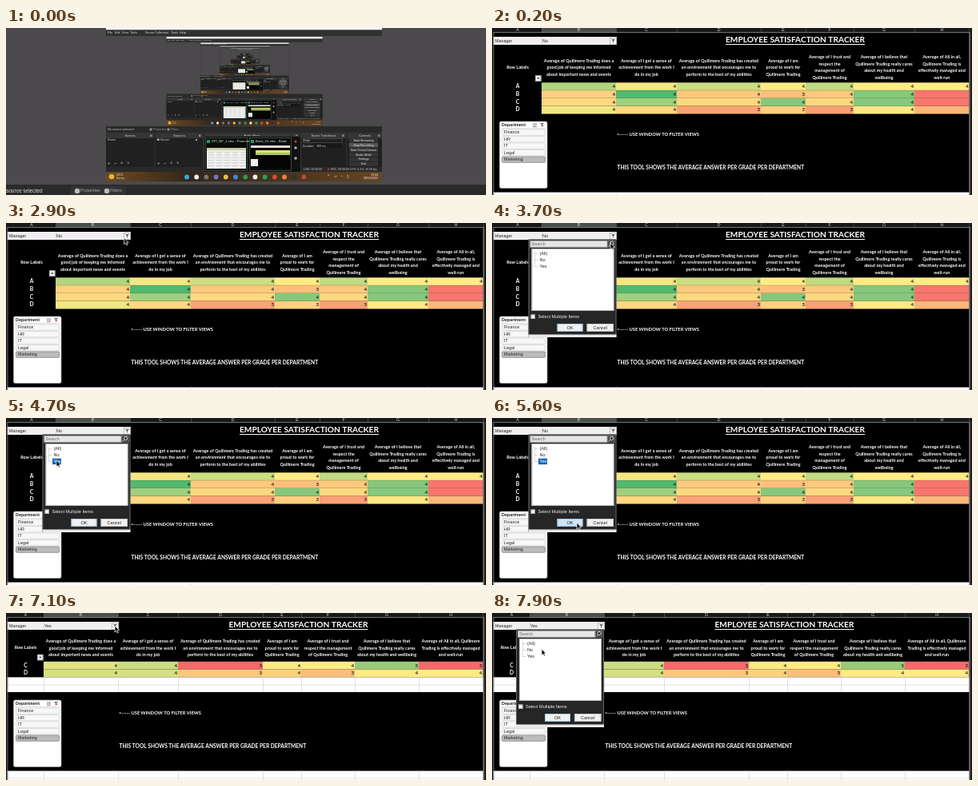
Recreate the animation shown at these times as an HTML page with a canvas. Size 600 by 209 pixels, loop 8 s.

```html
<!DOCTYPE html>
<html lang="en">
<head>
<meta charset="utf-8">
<title>Employee satisfaction tracker</title>
<style>
html, body { margin: 0; width: 600px; height: 209px; overflow: hidden; background: #000; }
canvas { display: block; }
</style>
</head>
<body>
<canvas id="stage" width="600" height="209"></canvas>
<script>
const ctx = document.getElementById('stage').getContext('2d');
const LOOP = 8000;
const SHEET = 'Lato, "Open Sans", sans-serif';
const UI = '"Liberation Sans", Arial, sans-serif';
const FIRM = 'Quillmere Trading';

function box(x, y, w, h, fill, line) {
  if (fill) { ctx.fillStyle = fill; ctx.fillRect(x, y, w, h); }
  if (line) { ctx.strokeStyle = line; ctx.lineWidth = 0.8; ctx.strokeRect(x + .5, y + .5, w - 1, h - 1); }
}
function round(x, y, w, h, r, fill, line) {
  ctx.beginPath(); ctx.roundRect(x, y, w, h, r);
  if (fill) { ctx.fillStyle = fill; ctx.fill(); }
  if (line) { ctx.strokeStyle = line; ctx.lineWidth = 0.7; ctx.stroke(); }
}
function dot(x, y, r, fill) {
  ctx.beginPath(); ctx.arc(x, y, r, 0, 7); ctx.fillStyle = fill; ctx.fill();
}
function text(str, x, y, size, color, o = {}) {
  ctx.font = `${o.weight || 400} ${size}px ${o.face || UI}`;
  ctx.textAlign = o.align || 'left';
  ctx.textBaseline = 'middle';
  ctx.fillStyle = color;
  ctx.fillText(str, x, y);
}
function poly(points, fill, line) {
  ctx.beginPath();
  points.forEach(([x, y]) => ctx.lineTo(x, y));
  ctx.closePath();
  if (fill) { ctx.fillStyle = fill; ctx.fill(); }
  if (line) { ctx.strokeStyle = line; ctx.lineWidth = 0.7; ctx.stroke(); }
}

// ---------- recording window, nested inside itself ----------

function thumbnail(x, title, spreadsheet) {
  box(x, 137, 53, 42, '#0c0c0c', '#3f5a46');
  box(x + 2, 140, 4, 4, '#1e9e55');
  text(title, x + 8, 142, 4.2, '#d9f0dd');
  if (spreadsheet) {
    box(x + 2, 150, 49, 26, '#050505');
    box(x + 2, 147, 49, 3, '#d8d8d8');
    box(x + 8, 153, 43, 3, '#e8dd6c');
    box(x + 8, 156, 43, 3, '#a9c769');
    box(x + 2, 164, 9, 9, '#eee');
  } else {
    box(x + 2, 150, 49, 26, '#efefef');
    box(x + 2, 150, 49, 3, '#c6cfa0');
    for (let i = 0; i < 6; i++) {
      for (let k = 0; k < 5; k++) box(x + 4 + k * 10, 155 + i * 3.4, 7, .6, '#bbb');
    }
  }
}

function dock(x, w, title) {
  box(x, 131, w, 43, '#202020');
  box(x, 131, w, 7, '#353535');
  text(title, x + w / 2, 134.8, 3.9, '#ddd', { align: 'center' });
  box(x + w - 5, 133.5, 2.5, 2.5, '#888');
}

function recorder(depth) {
  box(125, -2, 345, 194, '#414041');
  box(125, -2, 345, 4.5, '#f4f4f4');
  box(125, 2.5, 345, 7.5, '#303030');
  [['File', 127], ['Edit', 136], ['View', 145], ['Tools', 155], ['Scene Collection', 174], ['Tools', 206], ['Help', 217]]
    .forEach(([s, x]) => text(s, x, 6, 3.9, '#ddd'));
  box(125, 10, 345, 113, '#4b494b');
  if (depth) {
    ctx.save();
    ctx.translate(200.6, 11);
    ctx.scale(.565, .573);
    ctx.translate(-125, 2);
    recorder(depth - 1);
    ctx.restore();
  }

  box(125, 123, 345, 69, '#292929');
  text('No source selected', 127, 127, 3.8, '#ccc');
  dot(181, 127, 1.8, '#888'); text('Properties', 184, 127, 3.6, '#999');
  dot(203, 127, 1.8, '#888'); text('Filters', 206, 127, 3.6, '#999');

  dock(125, 60, 'Scenes');
  dock(187, 59, 'Sources');
  dock(248, 119, 'Audio Mixer');
  dock(369, 56, 'Scene Transitions');
  dock(427, 43, 'Controls');
  text('Scene', 127, 140, 3.6, '#ddd');
  text('Screen', 193, 140, 3.6, '#ddd');
  box(189, 138.5, 2.5, 2.5, '#bbb');
  dot(238, 140, 1, '#ddd');
  for (const x of [127, 189]) {
    ['+', '−', '˄', '˅'].forEach((s, i) => text(s, x + i * 8, 169.5, 6, '#ddd'));
  }
  text('Fade', 372, 141, 3.6, '#ddd');
  box(371, 138, 50, 6, null, '#4a4a4a');
  text('Duration', 371, 147.5, 3.6, '#ddd');
  box(386, 144.5, 34, 6, '#171717');
  text('300 ms', 388, 147.5, 3.6, '#ddd');
  ['Start Streaming', 'Stop Recording', 'Start Virtual Camera', 'Studio Mode', 'Settings', 'Exit'].forEach((s, i) => {
    box(429, 138 + i * 5.9, 36, 5.3, i === 1 ? '#555' : '#343434');
    text(s, 447, 140.8 + i * 5.9, 3.6, '#eee', { align: 'center' });
  });
  text('LIVE: 00:00:00', 372, 177, 3.5, '#ccc');
  dot(403, 177, 1.2, '#e33');
  text('REC: 00:00:00', 406, 177, 3.5, '#ccc');
  text('CPU: 6.2%, 30.00 fps', 430, 177, 3.5, '#ccc');

  const wood = ctx.createLinearGradient(125, 0, 470, 0);
  wood.addColorStop(0, '#6c4a22');
  wood.addColorStop(.3, '#33261a');
  wood.addColorStop(.65, '#4b3420');
  wood.addColorStop(1, '#644522');
  box(125, 180, 345, 12, wood);
  dot(132, 186, 3.3, '#e7b638');
  text('22°C', 138, 184, 3.7, '#fff');
  text('Sunny', 138, 188, 3.5, '#ddd');
  ['#38a7e7', '#eee', '#777', '#7173c9', '#e8bd4b', '#388ed4', '#2c9a56', '#eee', '#27a35a', '#d44b3c', '#e8863d', '#333', '#b54b36']
    .forEach((c, i) => dot(226 + i * 12.2, 186.5, 2.9, c));
  ['^', '▱', '◔', '▯'].forEach((s, i) => text(s, 402 + i * 8, 186, 4.8, '#fff'));
  text('19:04', 465, 184, 3.6, '#fff', { align: 'right' });
  text('09/12/2021', 465, 188.3, 3.6, '#fff', { align: 'right' });

  box(247, 135, 122, 46, '#111', '#444');
  thumbnail(249, 'XPI_NP_1.xlsx - Protected', false);
  thumbnail(304, 'Book_01.xlsx - Read', true);
  dot(362, 142, 1.5, '#bf4444');
  dot(362, 150, 1.8, '#aaa');
  dot(362, 163, 1.8, '#aaa');
}

function opening() {
  box(0, 0, 600, 209, '#4c4a4c');
  recorder(6);
  box(0, 196, 600, 13, '#2b2a2b');
  text('source selected', 0, 204, 6.5, '#ddd');
  box(81, 198, 38, 11, '#343334'); box(119, 198, 31, 11, '#343334');
  dot(89, 204, 3.2, '#bbb'); text('Properties', 93, 204, 5.4, '#aaa');
  dot(126, 204, 3.2, '#bbb'); text('Filters', 130, 204, 5.4, '#aaa');
}

// ---------- spreadsheet ----------

const questions = [
  [`Average of ${FIRM} does a`, 'good job of keeping me informed', 'about important news and events'],
  ['Average of I get a sense of', 'achievement from the work I', 'do in my job'],
  [`Average of ${FIRM} has created`, 'an environment that encourages me to', 'perform to the best of my abilities'],
  ['Average of I am', 'proud to work for', FIRM],
  ['Average of I trust and', 'respect the', 'management of', FIRM],
  ['Average of I believe that', `${FIRM} really cares`, 'about my health and', 'wellbeing'],
  ['Average of All in all,', `${FIRM} is`, 'effectively managed and', 'well-run']
];
const [firmA, firmB] = FIRM.split(' ');
const staff = {
  edges: [2, 62, 155, 231, 336, 392, 452, 528, 596.5], top: 68.3, mid: 49.5, titleX: 379, shift: 0,
  answer: 'No', heads: questions,
  rows: [
    ['A', '4444444', '#b1d47f #f3e783 #cbdc81 #ffeb84 #c2da81 #ffeb84 #ffeb84'],
    ['B', '4443444', '#fdd17f #52b96f #fdc97d #fdc07c #fdc97d #85c87c #f8766d'],
    ['C', '4444444', '#fdd880 #a0d07e #fdd880 #85c87c #fed880 #85c87c #f8766d'],
    ['D', '4433344', '#f0e784 #fdd880 #fba376 #fed07f #fb9f75 #ffe884 #fcb77a']
  ]
};
const managers = {
  edges: [2, 47, 140, 215, 321, 369, 436, 516, 596], top: 60.8, mid: 44, titleX: 365.5, shift: -8,
  answer: 'Yes',
  heads: questions.slice(0, 4).concat([
    ['Average of I trust and', 'respect the management', `of ${FIRM}`],
    ['Average of I believe that', `${FIRM} really cares`, 'about my health and wellbeing'],
    [`Average of All in all, ${firmA}`, `${firmB} is effectively managed`, 'and well-run']
  ]),
  rows: [
    ['C', '4434453', '#dfe382 #c9dc80 #f8696b #fbe983 #ffeb84 #98cb79 #f8696b'],
    ['D', '4434344', '#d7df80 #d5e082 #fdc77d #fdd27f #fdbd7b #ffeb84 #ffeb84']
  ]
};

function funnel(x, y, color) {
  poly([[x, y], [x + 5, y], [x + 3, y + 2.5], [x + 3, y + 5], [x + 2, y + 4], [x + 2, y + 2.5]], color);
}

function blankRows(v, y, h, step) {
  box(0, y, 600, h, '#fff');
  v.edges.forEach(x => box(x, y, .7, h, '#d5d5d5'));
  for (let k = step; k < h; k += step) box(0, y + k, 600, .7, '#d5d5d5');
}

function slicer(dy) {
  round(9.5, 116.5 + dy, 59.5, 83.5, 2, '#fff', '#aaa');
  text('Department', 12, 121.3 + dy, 5.4, '#222', { weight: 700 });
  for (let i = 0; i < 3; i++) box(51, 119 + i * 1.9 + dy, 5, .8, '#777');
  funnel(60, 118.5 + dy, '#777');
  box(61.5, 121.5 + dy, 3.2, .8, '#c44');
  box(11, 125 + dy, 56, .6, '#bbb');
  ['Finance', 'HR', 'IT', 'Legal', 'Marketing'].forEach((s, i) => {
    const y = 126.5 + i * 8.5 + dy;
    const on = i === 4;
    round(12.5, y, 54, 7.3, 1, on ? '#bcbcbc' : '#f7f7f7', on ? '#777' : '#cfcfcf');
    text(s, 15, y + 3.8, 5.4, '#222');
  });
}

function sheet(v) {
  const e = v.edges;
  const bold = { weight: 700, face: SHEET };
  const label = { ...bold, align: 'center' };
  box(0, 0, 600, 209, '#000');
  box(0, 0, 600, 6, '#191919');
  box(e[1], 0, e[2] - e[1], 6, '#4a4f4b');
  [...'ABCDEFGH'].forEach((c, i) => {
    text(c, (e[i] + e[i + 1]) / 2, 2.6, 5.2, '#ddd', { align: 'center' });
    box(e[i + 1], 0, .7, 6, '#555');
  });

  box(1, 11, e[2], 10, '#f0eef0');
  box(e[1], 11, .6, 10, '#ccc');
  text('Manager', 4, 16.2, 5.4, '#222');
  text(v.answer, e[1] + 1, 16.2, 5.4, '#222');
  box(e[2] - 8, 12, 9, 8.7, '#fff', '#aaa');
  funnel(e[2] - 6, 14, '#666');

  const name = 'EMPLOYEE SATISFACTION TRACKER';
  text(name, v.titleX, 15.2, 10.2, '#fff', label);
  const w = ctx.measureText(name).width;
  box(v.titleX - w / 2, 20, w, 1, '#fff');

  text('Row Labels', (e[0] + e[1]) / 2, v.mid - .6, 5.5, '#fff', label);
  box(e[1] - 8, v.top - 9, 7.5, 7.5, '#f4f4f4', '#999');
  poly([[e[1] - 6, v.top - 6], [e[1] - 2.5, v.top - 6], [e[1] - 4.2, v.top - 4]], '#333');
  v.heads.forEach((lines, i) => {
    const x = (e[i + 1] + e[i + 2]) / 2;
    const y = v.mid - (lines.length - 1) * 4.25;
    lines.forEach((s, k) => text(s, x, y + k * 8.5, 5.45, '#fff', label));
  });

  v.rows.forEach(([grade, scores, colors], r) => {
    const y = v.top + r * 9.8;
    text(grade, (e[0] + e[1]) / 2, y + 4.7, 6.8, '#fff', label);
    colors.split(' ').forEach((c, i) => {
      box(e[i + 1], y, e[i + 2] - e[i + 1], 9.8, c);
      box(e[i + 1], y + 9.3, e[i + 2] - e[i + 1], .5, 'rgba(90,80,40,.3)');
      if (i < 6 || v.shift || r === 0) {
        text(scores[i], e[i + 2] - 1, y + 4.9, 6.2, '#222', { ...bold, align: 'right' });
      }
    });
  });

  if (v.shift) blankRows(v, v.top + 19.6, 18.6, 9.3);
  blankRows(v, 205.6 + v.shift, 12, 9);

  text('<----- USE WINDOW TO FILTER VIEWS', e[2] + 1, 133 + v.shift, 5.75, '#fff', bold);
  text('THIS TOOL SHOWS THE AVERAGE ANSWER PER GRADE PER DEPARTMENT', e[2] + 1.5, 175.2 + v.shift, 6.62, '#fff', bold);
  slicer(v.shift + .5);

  // window frame
  box(0, 6, 1.6, 203, '#1a1a1a');
  box(1.6, 5.4, .8, 204, '#888');
  box(1.6, 5.2, 595, .9, '#7d8a80');
  box(596.5, 5, 3.5, 204, '#1a1a1a');
  box(596.5, 5, 1, 204, '#aaa');
}

function popup(x, picked, hover) {
  box(x, 20.5, 110, 122.5, '#262626', '#777');
  box(x, 139.5, 110, 3.5, '#e8e8e8');
  box(x + 2, 22, 97, 8.6, '#e6e6e6', '#999');
  text('Search', x + 4, 26.8, 5.5, '#666');
  box(x + 99, 22, 9, 8.6, '#333', '#888');
  ctx.strokeStyle = '#ddd'; ctx.lineWidth = 1;
  ctx.beginPath(); ctx.arc(x + 104, 25.6, 2.2, 0, 7); ctx.moveTo(x + 102.3, 27.3); ctx.lineTo(x + 100.5, 29.1); ctx.stroke();
  box(x + 4, 32, 103, 78, '#fff', '#aaa');
  ['(All)', 'No', 'Yes'].forEach((s, i) => {
    const y = 38.2 + i * 8.1;
    box(x + 8, y, 4, .5, '#aaa');
    if (i === 2 && picked) box(x + 12.5, y - 3.8, 11, 7.5, '#1769b5');
    text(s, x + 14, y, 5.5, i === 2 && picked ? '#fff' : '#222');
  });
  box(x + 8, 36, .5, 18.5, '#bbb');
  box(x + 3, 114.5, 5.5, 5.5, '#fff', '#999');
  text('Select Multiple Items', x + 12, 117.8, 5.6, '#eee');
  box(x + 36, 126, 32, 9.8, hover ? '#cfe6f7' : '#f1f1f1', '#8fc0e0');
  text('OK', x + 52, 131.2, 5.6, '#222', { align: 'center' });
  box(x + 73, 126, 33.5, 9.8, '#f1f1f1', '#bbb');
  text('Cancel', x + 89.7, 131.2, 5.6, '#222', { align: 'center' });
}

// ---------- pointer ----------

// time, x, y
const path = [
  [1000, 225, 190], [1600, 97, 79], [2000, 97, 79], [3000, 149, 17], [3350, 149, 17],
  [3650, 148, 25], [3850, 148, 25], [4500, 63, 53], [4900, 63, 53], [5400, 106, 131],
  [5800, 106, 131], [5850, 105, 134], [6400, 105, 134], [7050, 136, 16],
  [7350, 136, 16], [7750, 62, 45], [8000, 62, 45]
];
function pointerAt(t) {
  const i = path.findIndex(p => p[0] > t);
  if (i < 1) return null;
  const [a, b] = [path[i - 1], path[i]];
  const u = (t - a[0]) / (b[0] - a[0]);
  const k = u * u * (3 - 2 * u);
  return [a[1] + (b[1] - a[1]) * k, a[2] + (b[2] - a[2]) * k];
}
function pointer(x, y, arrow) {
  if (arrow) {
    poly([[x, y], [x, y + 8], [x + 1.9, y + 6.4], [x + 3.2, y + 9], [x + 4.5, y + 8.4], [x + 3.3, y + 5.8], [x + 5.6, y + 5.7]], '#111', '#fff');
    return;
  }
  box(x - 3.4, y - 1.4, 6.8, 2.8, '#111');
  box(x - 1.4, y - 3.4, 2.8, 6.8, '#111');
  box(x - 2.7, y - .8, 5.4, 1.6, '#fff');
  box(x - .8, y - 2.7, 1.6, 5.4, '#fff');
}

function draw(t) {
  ctx.clearRect(0, 0, 600, 209);
  if (t < 100) { opening(); return; }
  const first = t < 5800;
  sheet(first ? staff : managers);
  const open = first ? t >= 3300 : t >= 7300;
  if (open) popup(first ? 45.5 : 30, first && t >= 4700, first && t >= 5350);
  const p = pointerAt(t);
  if (p) pointer(p[0], p[1], open || p[1] < 22);
}

const start = performance.now();
function tick(now) {
  draw(Math.max(0, now - start) % LOOP);
  requestAnimationFrame(tick);
}
draw(0);
requestAnimationFrame(tick);
</script>
</body>
</html>
```
